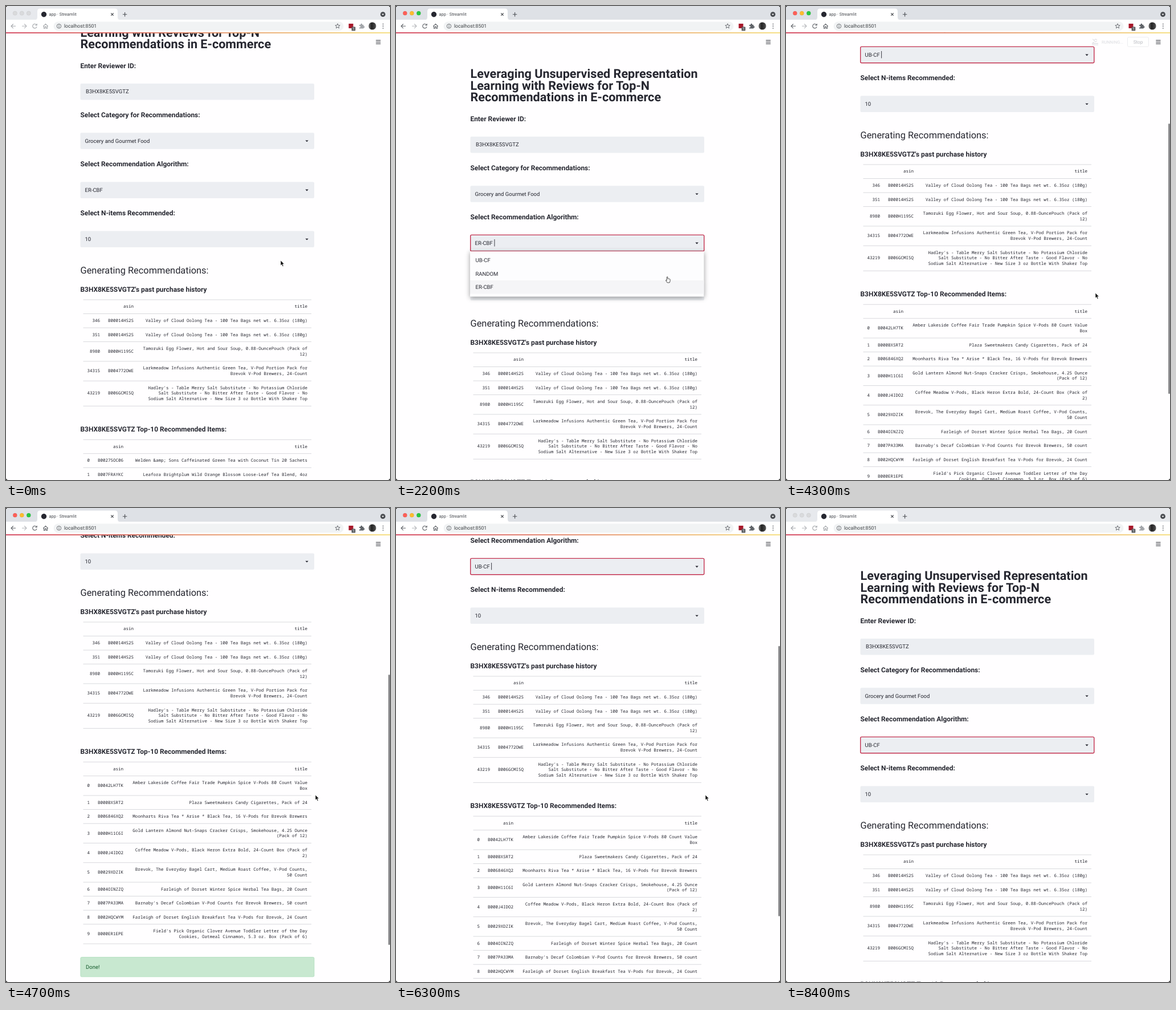
Recreate the animation shown at these times as an HTML page. Size 674 by 831 pixels, loop 9 s.

```html
<!DOCTYPE html>
<html lang="en">
<head>
<meta charset="utf-8">
<title>app</title>
<style>
html, body { margin: 0; width: 100%; height: 100%; overflow: hidden; background: #000; }
svg { display: block; text-rendering: geometricPrecision; font-family: Roboto, Arial, sans-serif; fill: #262730; }
.h1 { font-size: 21.6px; font-weight: 700; }
.h2 { font-size: 16.4px; }
.h3 { font-size: 11.9px; font-weight: 600; }
.ui { font-size: 9.5px; }
.mono { font: 7.53px "Noto Sans Mono", "DejaVu Sans Mono", monospace; }
.icon { fill: none; stroke: #5f6368; stroke-width: 1.1; }
.idle .icon { stroke: #a3a6aa; }
.idle .light { fill: #d9dadc; stroke: #c6c7ca; }
.idle #puzzle { fill: #a3a6aa; }
.idle #strip { fill: #e7e9ed; }
#list { filter: drop-shadow(0 2px 4px #0006); }
</style>
</head>
<body>
<svg id="stage" width="674" height="831" viewBox="0 0 674 831"></svg>
<script>
const USER = 'B3HX8KE5SVGTZ';
const history = [
  ['346', 'B00014HS2S', 'Valley of Cloud Oolong Tea - 100 Tea Bags net wt. 6.35oz (180g)'],
  ['351', 'B00014HS2S', 'Valley of Cloud Oolong Tea - 100 Tea Bags net wt. 6.35oz (180g)'],
  ['8980', 'B000H1195C', 'Tamoruki Egg Flower, Hot and Sour Soup, 0.88-OuncePouch (Pack of|12)'],
  ['34315', 'B004772OWE', 'Larkmeadow Infusions Authentic Green Tea, V-Pod Portion Pack for|Brevok V-Pod Brewers, 24-Count'],
  ['43219', 'B006GCMI5Q', "Hadley's - Table Merry Salt Substitute - No Potassium Chloride|Salt Substitute - No Bitter After Taste - Good Flavor - No|Sodium Salt Alternative - New Size 3 oz Bottle With Shaker Top"]
];
const firstPicks = [
  ['0', 'B00275OC06', 'Welden &amp;amp; Sons Caffeinated Green Tea with Coconut Tin 20 Sachets'],
  ['1', 'B007FRAYKC', 'Leafora Brightplum Wild Orange Blossom Loose-Leaf Tea Blend, 4oz']
];
const nextPicks = [
  ['0', 'B0042LH7TK', 'Amber Lakeside Coffee Fair Trade Pumpkin Spice V-Pods 80 Count Value|Box'],
  ['1', 'B000BXSRT2', 'Plaza Sweetmakers Candy Cigarettes, Pack of 24'],
  ['2', 'B006846XQ2', 'Moonharts Riva Tea * Arise * Black Tea, 16 V-Pods for Brevok Brewers'],
  ['3', 'B000H11C6I', 'Gold Lantern Almond Nut-Snaps Cracker Crisps, Smokehouse, 4.25 Ounce|(Pack of 12)'],
  ['4', 'B000J4IDO2', 'Coffee Meadow V-Pods, Black Heron Extra Bold, 24-Count Box (Pack of|2)'],
  ['5', 'B0029XDZIK', 'Brevok, The Everyday Bagel Cart, Medium Roast Coffee, V-Pod Counts,|50 Count'],
  ['6', 'B004OINZZQ', 'Farleigh of Dorset Winter Spice Herbal Tea Bags, 20 Count'],
  ['7', 'B007PA33MA', "Barnaby's Decaf Colombian V-Pod Counts for Brevok Brewers, 50 count"],
  ['8', 'B002HQCWYM', 'Farleigh of Dorset English Breakfast Tea V-Pods for Brevok, 24 Count'],
  ['9', 'B000ER1EPE', "Field's Pick Organic Clover Avenue Toddler Letter of the Day|Cookies, Oatmeal Cinnamon, 5.3 oz. Box (Pack of 6)"]
];

const text = (x, y, cls, s, more = '') => `<text x="${x}" y="${y}" class="${cls}" ${more}>${s}</text>`;
const rect = (x, y, w, h, fill, more = '') => `<rect x="${x}" y="${y}" width="${w}" height="${h}" fill="${fill}" ${more}/>`;
const circle = (x, y, r, fill, more = '') => `<circle cx="${x}" cy="${y}" r="${r}" fill="${fill}" ${more}/>`;
const path = (d, more = 'class="icon"') => `<path d="${d}" ${more}/>`;

function table(y, rows, indexX, asinX) {
  const cell = (x, cy, s) => text(x, cy + 2.2, 'mono', s, 'text-anchor="end"');
  const rule = () => rect(135.5, y - .4, 400.5, .8, '#cfd0d5');
  let out = rule();
  for (const [id, asin, title] of [['', 'asin', 'title'], ...rows]) {
    const lines = title.split('|'), h = 24.55 + 9.75 * (lines.length - 1), mid = y + h / 2;
    out += cell(indexX, mid, id) + cell(asinX, mid, asin);
    lines.forEach((s, i) => out += cell(529, mid + 9.75 * (i - (lines.length - 1) / 2), s));
    y += h;
    out += rule();
  }
  return out;
}

function field(i, label, value, id) {
  const y = 229 + 86.2 * i;
  return text(130.5, y - 27.4, 'h3', label) + rect(130.5, y, 410.5, 28.5, '#eceef2', 'rx="2"') +
    text(i ? 138.5 : 140, y + 17.4, 'ui', value, id ? `id="${id}"` : '') +
    (i ? path(`M525.4 ${y + 13.2}h5.4l-2.7 2.8z`, '') : '');
}

const page = ['Leveraging Unsupervised Representation', 'Learning with Reviews for Top-N', 'Recommendations in E-commerce']
  .map((s, i) => text(130.5, 126 + 20.65 * i, 'h1', s)).join('') +
  field(0, 'Enter Reviewer ID:', USER) +
  field(1, 'Select Category for Recommendations:', 'Grocery and Gourmet Food') +
  field(2, 'Select Recommendation Algorithm:', 'ER-CBF', 'algo') +
  field(3, 'Select N-items Recommended:', '10') +
  rect(130.7, 401.4, 410.1, 28.3, 'none', 'id="focus" rx="2" stroke="#c2304f" stroke-width="1.4"') +
  text(130.5, 562, 'h2', 'Generating Recommendations:') +
  text(130.5, 593.8, 'h3', USER + "'s past purchase history") +
  table(608, history, 165, 224) +
  text(130.5, 839, 'h3', USER + ' Top-10 Recommended Items:') +
  `<g id="before">${table(853.2, firstPicks, 147, 206)}</g>` +
  `<g id="after">${table(853.2, nextPicks, 147, 206)}` +
  rect(130.9, 1195.5, 410, 34.3, '#c8e8d0', 'rx="2" stroke="#addfbb" stroke-width=".8"') +
  text(140, 1216, 'ui', 'Done!', 'fill="#155a2c"') + '</g>' +
  `<g id="list">${rect(130, 430, 410.5, 79.5, '#fdfdfe')}${rect(130, 481, 410.5, 23.5, '#f5f5f7', 'id="hover"')}` +
  ['UB-CF', 'RANDOM', 'ER-CBF'].map((s, i) => text(139.5, 449.3 + 23.5 * i, 'ui', s)).join('') + '</g>' +
  rect(167.2, 409, .9, 12.5, '#262730', 'id="caret"');

const star = [...Array(10)].map((_, i) => {
  const r = i % 2 ? 1.9 : 4.4, a = i * Math.PI / 5;
  return (582 + r * Math.sin(a)) + ' ' + (35.3 - r * Math.cos(a));
}).join('L');

const chrome = rect(0, 0, 674, 25, '#dee1e6', 'id="strip"') + rect(0, 24, 674, 22.5, '#fff') +
  path('M50 24.5q5 0 5-5v-10q0-5 5-5h131q5 0 5 5v10q0 5 5 5z', 'fill="#fff"') +
  ['#ff5f57', '#febc2e', '#28c840'].map((c, i) => circle(15.8 + 12 * i, 12.7, 3.6, c, 'class="light" stroke="#0002" stroke-width=".5"')).join('') +
  circle(66.5, 14.7, 4.7, '#262730') +
  text(75.5, 17.3, '', 'app · Streamlit', 'font-size="7.5" fill="#45484d"') +
  path('M184.3 12.5l4.4 4.4m0-4.4l-4.4 4.4M208.6 11v7.4m-3.7-3.7h7.4', 'fill="none" stroke="#4a4d52" stroke-width="1.1"') +
  circle(661.5, 14.7, 4.4, '#484b50') + path('M659.4 13.7h4.2l-2.1 2.5z', 'fill="#fff"') +
  path('M17 35.3h-8m3.8-3.8l-3.8 3.8l3.8 3.8') +
  path('M28 35.3h8m-3.8-3.8l3.8 3.8l-3.8 3.8', 'fill="none" stroke="#b4b6ba" stroke-width="1.1"') +
  path('M53.4 33a3.7 3.7 0 1 0 .6 3.3M54.2 31v2.8h-2.8') +
  path('M65.2 35.6l4.3-4.2l4.3 4.2M66.5 34.6v4.6h2v-2.8h2v2.8h2v-4.6') +
  rect(83.5, 27.5, 509, 15.8, '#f1f3f4', 'rx="7.9"') +
  circle(93, 35.3, 3.7, 'none', 'stroke="#5f6368" stroke-width=".9"') + rect(92.5, 34.6, 1, 2.8, '#5f6368') + rect(92.5, 33, 1, 1, '#5f6368') +
  text(102, 38.3, '', 'localhost:8501', 'font-size="8.7" fill="#3c4043"') +
  path(`M${star}z`, 'fill="none" stroke="#5f6368" stroke-width=".9"') +
  rect(601.5, 31, 8, 8, '#a8182a') + rect(606.5, 36.5, 6.8, 7, '#5c5f63', 'rx="1"') +
  text(609.9, 42.4, '', '1', 'font-size="6" fill="#fff" text-anchor="middle"') +
  path('M620 33h2.4a1.6 1.6 0 1 1 3 0h2.2v2.3a1.5 1.5 0 1 1 0 2.9v1.4h-7.6v-2a1.5 1.5 0 1 0 0-2.6z', 'id="puzzle" fill="#5f6368"') +
  circle(643, 35, 6.6, 'url(#face)') +
  [31.6, 35.2, 38.8].map(y => circle(661.8, y, .9, '#5f6368')).join('') +
  rect(0, 46.2, 674, 1.7, 'url(#bar)');

const overlay = [60.2, 63.2, 66.2].map(y => rect(649.3, y - .55, 8.2, 1.1, '#33343c')).join('') +
  '<g id="running">' +
  path('M537 68h11M537 65.5h11M538 58l3 2 2-2 3 1M540 60l3 3 3-2M541 63.5l-3 1', 'fill="none" stroke="#d9dade" stroke-width="1"') +
  text(554, 66, '', 'RUNNING...', 'font-size="7.4" fill="#dadbdf"') +
  rect(599.5, 54.7, 37, 16.6, '#fff', 'rx="2" stroke="#e7e8eb" stroke-width=".8"') +
  text(618, 65.8, '', 'Stop', 'font-size="8.2" fill="#b9bac0" text-anchor="middle"') + '</g>' +
  rect(671, 0, 3, 474, '#8b8b8d', 'id="thumb" rx="1.5"');

const cursors = path('M0 0v9l2-1.8l1.5 3.4l1.6-.7l-1.5-3.3h2.8z', 'id="arrow" fill="#111" stroke="#fff" stroke-width=".6"') +
  path('M2.3 6V1.2q.9-1.2 1.7 0v3q.8-.7 1.4.1q.9-.6 1.4.3q1-.4 1.3.6v3.1l-1 2.7h-4l-2.7-4q0-1.3 1.9.2z', 'id="hand" fill="#fff" stroke="#222" stroke-width=".8"');

const $ = id => document.getElementById(id);
$('stage').innerHTML = `<defs>
<linearGradient id="bar"><stop stop-color="#d0344f"/><stop offset="1" stop-color="#f5db72"/></linearGradient>
<linearGradient id="face"><stop stop-color="#777"/><stop offset=".4" stop-color="#222"/><stop offset="1" stop-color="#555"/></linearGradient>
<clipPath id="round"><rect width="674" height="831" rx="4"/></clipPath></defs>
<g id="win" clip-path="url(#round)">${rect(0, 0, 674, 831, '#fffeff')}<g id="page">${page}</g>${overlay}${chrome}</g><g id="pointer">${cursors}</g>`;

// Keys are [ms, value]; values between keys are linear.
const scrollKeys = [[0, 93], [100, 72], [200, 38], [300, 12], [400, 0], [3600, 0], [3800, 37], [3900, 58], [4300, 330], [4600, 404], [4700, 408],
  [4800, 470], [4900, 483], [5500, 483], [5800, 400], [6000, 400], [6200, 321], [6300, 313], [6600, 130], [6900, 0]];
const xKeys = [[0, 482], [600, 482], [1200, 480], [1900, 480], [2200, 473], [2700, 473], [3400, 543], [6800, 543], [7100, 640]];
const yKeys = [[0, 446], [600, 446], [1200, 412], [1400, 412], [1600, 423], [1800, 423], [2200, 474], [2500, 444], [2700, 444],
  [3400, 503], [6800, 503], [6900, 418], [7100, -20]];

function at(keys, t) {
  const i = keys.findIndex(k => k[0] > t);
  if (i < 0) return keys.at(-1)[1];
  const [t0, a] = keys[i - 1], [t1, b] = keys[i];
  return a + (b - a) * (t - t0) / (t1 - t0);
}
const show = (id, on) => $(id).style.display = on ? '' : 'none';

function draw(now) {
  const t = Math.floor(now % 9000 / 100) * 100;
  const y = at(scrollKeys, t), px = at(xKeys, t), py = at(yKeys, t);
  const open = t >= 1000 && t < 2600, hand = t >= 1200 && t < 2800;
  const blink = (t + 900) % 1000 < 500;
  $('page').setAttribute('transform', `translate(0 ${-y})`);
  $('win').setAttribute('class', t >= 800 && t < 8000 ? '' : 'idle');
  $('pointer').setAttribute('transform', `translate(${px} ${py})`);
  // The thumb trails the page by a tenth of a second.
  $('thumb').setAttribute('y', 47.5 + .605 * at(scrollKeys, Math.max(0, t - 100)));
  $('hover').setAttribute('y', t < 2300 ? 481 : t < 2400 ? 457.5 : 434);
  $('algo').textContent = t < 2600 ? 'ER-CBF' : 'UB-CF';
  $('caret').setAttribute('x', t < 2600 ? 172.5 : 167.2);
  show('caret', open || t >= 2600 && t < 8000 && blink);
  show('focus', t >= 1000);
  show('list', open);
  show('before', t < 3600);
  show('after', t >= 3600);
  show('running', t >= 2900 && t < 4400);
  show('thumb', t >= 3600 && t < 7400);
  show('hand', hand);
  show('arrow', !hand);
  requestAnimationFrame(() => draw(performance.now() - start));
}
const start = performance.now();
draw(0);
</script>
</body>
</html>
```
